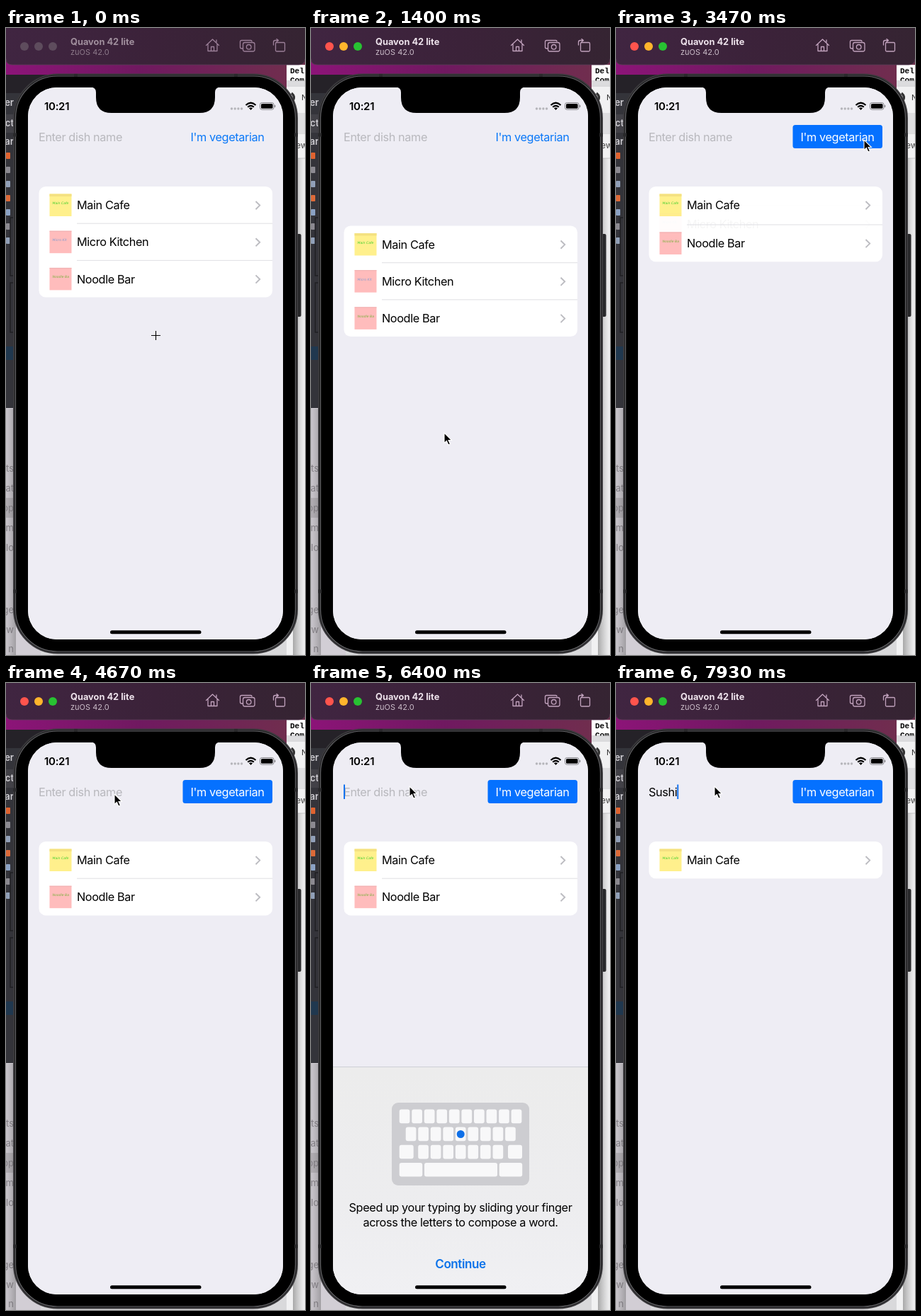
An HTML page that plays this animation: 422x886 px, repeating every 8 s.

```html
<!DOCTYPE html>
<html lang="en">
<head>
<meta charset="utf-8">
<title>Dish finder</title>
<style>
html, body { margin: 0; width: 100%; height: 100%; overflow: hidden; background: #333; }
svg { display: block; width: 422px; height: 886px; }
text { font-family: Inter, "Liberation Sans", sans-serif; white-space: pre; }
.body { font-size: 16.3px; letter-spacing: -.4px; }
.mid { text-anchor: middle; }
.mono { font: 700 11px "Liberation Mono", monospace; }
.side { font-size: 13px; fill: #858087; }
.note { font: italic 4.6px "DejaVu Sans", sans-serif; }
</style>
</head>
<body>
<svg viewBox="0 0 422 886" xmlns="http://www.w3.org/2000/svg">
<defs>
  <linearGradient id="wall"><stop stop-color="#8c1478"/><stop offset=".45" stop-color="#701960"/><stop offset="1" stop-color="#70304c"/></linearGradient>
  <linearGradient id="bar"><stop stop-color="#402541"/><stop offset=".5" stop-color="#3b2239"/><stop offset="1" stop-color="#352432"/></linearGradient>
  <linearGradient id="shadeR"><stop stop-color="#777" stop-opacity=".6"/><stop offset="1" stop-color="#999" stop-opacity="0"/></linearGradient>
  <linearGradient id="shadeL"><stop stop-color="#777" stop-opacity=".1"/><stop offset="1" stop-color="#555" stop-opacity=".4"/></linearGradient>
  <linearGradient id="panelFill" x2="0" y2="1"><stop stop-color="#ececec"/><stop offset=".6" stop-color="#ededef"/><stop offset="1" stop-color="#f0f0f3"/></linearGradient>
  <clipPath id="screen"><rect x="31" y="84" width="360" height="780" rx="41"/></clipPath>
</defs>

<!-- desktop behind the phone -->
<rect width="422" height="886" fill="url(#wall)"/>
<g id="left">
  <rect y="66" width="200" height="472" fill="#34343a"/>
  <rect y="66" width="200" height="26" fill="#252228"/>
  <rect y="122" width="14" height="26" fill="#424147"/>
  <rect y="450" width="14" height="19" fill="#20384f"/>
  <rect y="537" width="49" height="349" fill="#d2ced5"/>
  <rect y="664" width="14" height="28" fill="#b8b4ba"/>
</g>
<rect x="49" y="700" width="373" height="186" fill="#d9d9db"/>
<rect x="396" y="52" width="26" height="834" fill="#f1f1f2"/>
<rect x="396" y="52" width="26" height="22" fill="#fff"/>
<rect x="396" y="74" width="26" height="9" fill="#d9d9dc"/>
<path d="M396 149H422M396 184H422" stroke="#c8c8ca"/>
<rect x="396" y="120" width="26" height="28" fill="#dedee0"/>
<text class="mono" x="401" y="64">Del</text>
<text class="mono" x="401" y="77">Com</text>
<rect x="396" y="74.5" width="26" height="7" fill="#dcdcde"/>
<path d="M403 92q6 5 2 11" fill="none" stroke="#333" stroke-width="3"/>
<text x="417" y="102" font-size="11" fill="#333">N</text>
<text x="409" y="170" font-size="12" fill="#444">ew</text>
<rect x="405" y="184" width="17" height="702" fill="url(#shadeR)"/>
<rect x="405" y="291" width="11.500" height="117" rx="2" fill="#29292b"/>
<rect y="538" width="14" height="348" fill="url(#shadeL)"/>

<!-- simulator toolbar -->
<path d="M0 0H422V44Q422 52 413 52H9Q0 52 0 44Z" fill="url(#bar)"/>
<path d="M0 43.500Q0 52 9 52H413Q422 52 422 43.500" fill="none" stroke="#5a3d56" stroke-width=".8"/>
<g id="lights"><circle cx="26" cy="26" r="6"/><circle cx="46" cy="26" r="6"/><circle cx="66" cy="26" r="6"/></g>
<g id="caption">
  <text x="91" y="23.500" font-size="12.800" font-weight="700">Quavon 42 lite</text>
  <text x="91" y="37.800" font-size="11" opacity=".8">zuOS 42.0</text>
</g>
<g id="tools" fill="none" stroke-width="1.300" stroke-linejoin="round" stroke-linecap="round">
  <path d="M282.500 24.500L291.500 16L300.500 24.500M285 22.500V32.500H298V22.500M289.500 32V26.500H293.500V32M297 17V20"/>
  <path d="M334 29H332.500Q330.500 29 330.500 27V19.500Q330.500 17.500 332.500 17.500H345.500Q347 17.500 347 19"/>
  <rect x="334.500" y="20.500" width="16.500" height="12.500" rx="2.500"/><circle cx="342.700" cy="26.800" r="3.300"/>
  <rect x="380.500" y="20.500" width="13" height="12.500" rx="1.500"/>
  <path d="M377.500 24V20Q377.500 17.500 380 17.500H384M382 15.500L384.500 17.500L382 19.500"/>
</g>

<!-- phone -->
<rect x="11" y="65.500" width="400" height="818" rx="62" fill="#131314" stroke="#3a393c" stroke-width="2"/>
<rect x="13.500" y="68" width="395" height="813" rx="59" fill="#000" stroke="#656568" stroke-width="1.200"/>
<rect x="16" y="70.500" width="390" height="808" rx="56"/>
<path d="M98.500 65V69M324.500 65V69M10 151H15M407 151H412M10 796H15M407 796H412" stroke="#29292b" stroke-width="5"/>

<g clip-path="url(#screen)">
  <rect x="31" y="84" width="360" height="780" fill="#fff"/>
  <rect id="page" x="31" y="84" width="360" height="780" fill="#eeedf4"/>
  <text id="hint" class="body" x="46" y="159.600" fill="#b8b8bd">Enter dish name</text>
  <text id="query" class="body" x="46" y="159.600"></text>
  <rect id="caret" y="143.500" width="2" height="20.500" fill="#1473f0"/>
  <rect id="button" x="249.500" y="137" width="126.500" height="33" rx="3.500" fill="#0571ff"/>
  <text id="label" class="body mid" x="312.500" y="159.600">I'm vegetarian</text>
  <g id="list"><rect id="card" x="46.500" width="329.500" rx="9.500" fill="#fff"/></g>
  <g id="keyboard">
    <rect x="31" width="360" height="324" fill="#ced0d6"/>
    <path d="M150.500 12V37M270.500 12V37" stroke="#b9bbc1"/>
    <g font-size="14.500">
      <text x="88" y="31" font-size="11" fill="#555">“</text>
      <text x="200" y="31">I’</text><text x="210" y="31" font-size="11" fill="#a5a7ac">o</text>
      <text x="324" y="31" font-size="11" fill="#888a90">h</text><text x="334" y="31">e</text>
    </g>
    <g id="keys"></g>
  </g>
  <g id="panel">
    <rect x="31" y="543" width="360" height="322" fill="url(#panelFill)"/>
    <rect x="114" y="593" width="194" height="117" rx="9" fill="#cdcdd1"/>
    <g id="miniKeys" fill="#f8f8f9"></g>
    <circle cx="211.200" cy="637.500" r="5.500" fill="#0f70e8"/>
    <g class="body mid">
      <text x="211" y="747">Speed up your typing by sliding your finger</text>
      <text x="211" y="767.500">across the letters to compose a word.</text>
      <text x="211" y="827" font-size="17" font-weight="600" fill="#0a72ea">Continue</text>
    </g>
  </g>
  <rect x="147" y="851.300" width="128.500" height="5" rx="2.500"/>
</g>
<path d="M120 83.500Q127 84 127 91V98Q127 120 149 120H273Q295 120 295 98V91Q295 84 302 83.500Z"/>
<text x="54" y="115.700" font-size="15" font-weight="600" letter-spacing="-.3">10:21</text>
<path d="M318.500 114H334" stroke="#b5b5ba" stroke-width="3.400" stroke-linecap="round" stroke-dasharray="0 4.700"/>
<g fill="none" stroke="#000" stroke-width="2.200">
  <path d="M338.500 109Q345.500 102.500 352.500 109M341.200 111.800Q345.500 107.800 349.800 111.800"/>
  <path d="M343.500 113.500Q345.500 112 347.500 113.500L345.500 115.500Z" fill="#000" stroke-width="1"/>
  <rect x="358.500" y="105.500" width="19.500" height="9.800" rx="2.800" stroke="#85858a" stroke-width="1"/>
  <rect x="360" y="107" width="16.500" height="6.800" rx="1.500" fill="#000" stroke="none"/>
  <path d="M379.600 108.800V112" stroke="#85858a" stroke-width="1.300"/>
</g>
<path id="cross" d="M205 434.500H218M211.500 428V441" stroke="#000" stroke-width="1.100"/>
<path id="arrow" d="M0 0V14.500L3.400 11.500L5.800 17L8.400 15.900L6 10.500H10.500Z" stroke="#fff" stroke-width="1.100"/>
</svg>
<script>
const $ = id => document.getElementById(id);
const set = (el, attrs) => { for (const k in attrs) el.setAttribute(k, attrs[k]); };
const LOOP = 8000, FPS = 15, ROW = 52.2;

// Progress from 0 to 1 between a and b
const ease = (t, a, b) => {
  const x = Math.min(1, Math.max(0, (t - a) / (b - a)));
  return x * x * (3 - 2 * x);
};

const dishes = [
  ["Main Cafe", "#fff08c", "#3fd02e"],
  ["Micro Kitchen", "#ffbcbc", "#7d9bd0"],
  ["Noodle Bar", "#ffbcbc", "#78b03c"]
];
$("list").insertAdjacentHTML("beforeend", dishes.map(([name, paper, ink], i) => `<g class="row">
  ${i ? '<path d="M100 0H376" stroke="#dfdfe3"/>' : ""}
  <rect x="61.500" y="10.500" width="31" height="31.500" fill="${paper}"/>
  <rect x="61.500" y="10.500" width="31" height="${i ? 1 : 3.5}" fill="${i ? "#efaeb0" : "#f4e181"}"/>
  <text class="note" x="65.500" y="25" fill="${ink}" textLength="">${name.slice(0, 9)}</text>
  <text class="body" x="100" y="32.300">${name}</text>
  <path d="M352.500 21L358.200 26.600L352.500 32.200" fill="none" stroke="#bcbcc1" stroke-width="1.900"/>
</g>`.replace(' textLength=""', "")).join(""));
const rows = [...document.querySelectorAll(".row")];

const box = (x, y, w, h, r, fill = "") =>
  `<rect x="${x}" y="${y}" width="${w}" height="${h}" rx="${r}" ${fill && `fill="${fill}"`}/>`;

function bigKey(x, y, w, label, size = 22, fill = "#fff") {
  return box(x, y + 1, w, 40, 4.5, "#8b8d92") + box(x, y, w, 40, 4.5, fill) +
    `<text class="mid" x="${x + w / 2}" y="${y + 27}" font-size="${size}">${label}</text>`;
}
const letters = [["qwertyuiop", 34], ["asdfghjkl", 52], ["zxcvbnm", 88]];
$("keys").innerHTML = letters.map(([line, x], r) =>
  [...line].map((c, i) => bigKey(x + 36 * i, 56 + 52 * r, 30, c)).join("")).join("") +
  bigKey(34, 160, 41, "⇧", 18, "#abb0ba") + bigKey(347, 160, 41, "⌫", 16, "#abb0ba") +
  bigKey(34, 212, 84, "123", 15, "#abb0ba") + bigKey(124, 212, 174, "space", 15) +
  bigKey(304, 212, 84, "return", 15, "#abb0ba");

const miniRow = (n, x, y) =>
  Array.from({ length: n }, (_, i) => box(x + 17.55 * i, y, 14.7, 19.8, 3)).join("");
$("miniKeys").innerHTML = miniRow(10, 124.7, 602.5) + miniRow(9, 133.7, 627.5) + miniRow(7, 151.2, 652.7) +
  [[124.7, 652.7, 20], [278, 652.7, 20], [124.7, 678, 32.5], [160, 678, 103], [265.7, 678, 32.5]]
    .map(([x, y, w]) => box(x, y, w, 19.6, 3)).join("");

const sideText = [["tter", 110], ["ject", 139], ["ear", 165]];
const grayText = [["ents", 627], ["cat", 655], ["top", 683], ["m", 711], ["nlo", 739], ["ge", 827], ["w", 855], ["n", 882]];
const sideLine = (fill, weight) => ([s, y]) =>
  `<text class="side" x="11" y="${y}" text-anchor="end" style="fill:${fill};font-weight:${weight}">${s}</text>`;
$("left").innerHTML += sideText.map(sideLine("#d2d0d5", 600)).join("") + grayText.map(sideLine("#858087", 400)).join("") +
  ["#e0632f", "#8c8a91", "#91a0b8", "#dd6a38", "#8ba2c4", "#8c8a91", "#91a0b8"]
    .map((c, i) => box(0, 176 + 20 * i, 6, 9, 1, c)).join("") +
  '<path d="M14 268H6V350H14M14 360H6V430H14" fill="none" stroke="#1f1f23" stroke-width="1.500"/>';

// time, x, y of the pointer tip
const path = [
  [0, 211, 434], [400, 205, 464], [1330, 188, 572], [1530, 188, 572], [2270, 170, 166],
  [2730, 350, 158], [4330, 350, 158], [4530, 153, 157], [5000, 153, 157], [5270, 139, 146]
];
function pointer(t) {
  const i = path.findIndex(p => p[0] > t);
  if (i < 0) return path[path.length - 1].slice(1);
  const [a, x, y] = path[i - 1], [b, u, v] = path[i], p = ease(t, a, b);
  return [x + (u - x) * p, y + (v - y) * p];
}

const typed = [[6600, "S"], [6860, "Su"], [7130, "Sus"], [7330, "Sush"], [7800, "Sushi"]];

function drawWindow(active) {
  const colors = active ? ["#ff544d", "#ffb52c", "#28c232"] : Array(3).fill("#5e4c5d");
  [...$("lights").children].forEach((c, i) => set(c, { fill: colors[i] }));
  set($("caption"), { fill: active ? "#ede2eb" : "#a08f9d" });
  set($("tools"), { stroke: active ? "#c1a2bd" : "#9b7f98" });
}

function drawList(t) {
  const pull = 55.5 * ease(t, 400, 1330) * (1 - ease(t, 1530, 1930));
  const shown = [1, 1 - ease(t, 3200, 3500), 1 - ease(t, 6600, 6900)];
  let y = 224 + pull;
  set($("card"), { y, height: ROW * shown.reduce((a, b) => a + b) });
  rows.forEach((row, i) => {
    set(row, { transform: `translate(0 ${y - (1 - shown[i]) * ROW / 2})`, opacity: shown[i] });
    y += ROW * shown[i];
  });
}

function drawField(t) {
  const word = (typed.filter(([at]) => at <= t).pop() || [0, ""])[1];
  $("query").textContent = word;
  set($("hint"), { opacity: word ? 0 : 1 });
  const x = word ? 46 + $("query").getComputedTextLength() : 46;
  set($("caret"), { x, opacity: t >= 5330 ? 1 : 0 });
  const on = t >= 3200;
  set($("button"), { opacity: on ? 1 : 0 });
  set($("label"), { fill: on ? "#fff" : "#0a78f8" });
}

function drawKeyboard(t) {
  const rise = 322 * (1 - ease(t, 5330, 5730));
  const drop = 322 * ease(t, 6730, 7050);
  const up = t >= 5330 && t < 7130;
  set($("keyboard"), { transform: `translate(0 ${542 + rise + drop})`, opacity: up ? 1 : 0 });
  set($("panel"), { transform: `translate(0 ${rise + drop})`, opacity: up ? 1 - ease(t, 6600, 6730) : 0 });
  set($("page"), { height: t < 6730 ? 780 : 458 + 322 * ease(t, 6805, 7125) });
}

function draw(t) {
  const active = t >= 400;
  drawWindow(active);
  drawList(t);
  drawField(t);
  drawKeyboard(t);
  const [x, y] = pointer(t);
  set($("arrow"), { transform: `translate(${x} ${y})`, opacity: active ? 1 : 0 });
  set($("cross"), { transform: `translate(${x - 211} ${y - 434})`, opacity: active ? 0 : 1 });
}

const start = performance.now();
function tick() {
  const t = (performance.now() - start) % LOOP;
  draw(Math.floor((t + 5) * FPS / 1000) * 1000 / FPS);
  requestAnimationFrame(tick);
}
tick();
</script>
</body>
</html>
```
